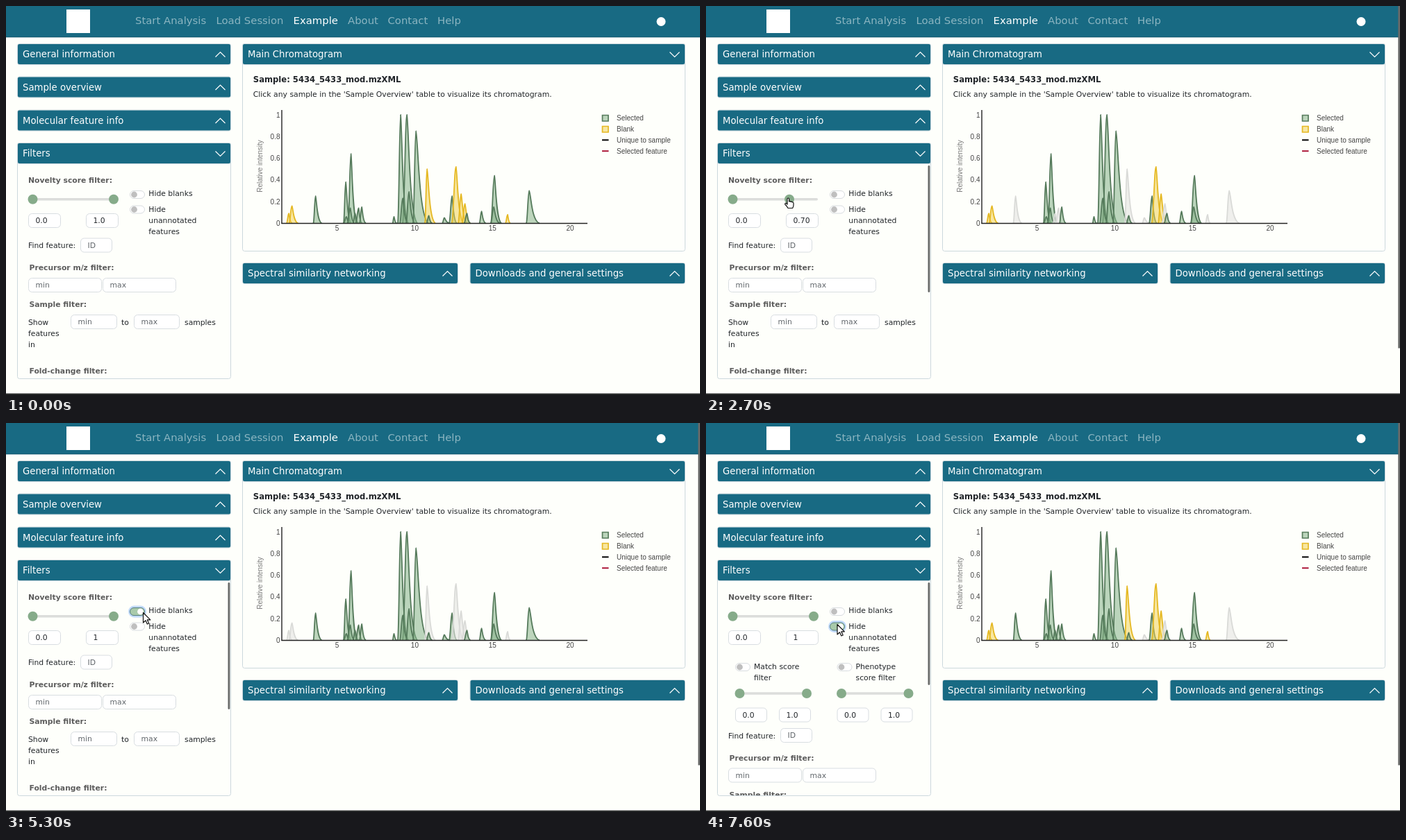
Write an HTML page that moves like this. It is 999 by 561 pixels and loops after 8000 ms.

```html
<!DOCTYPE html>
<html lang="en">
<head>
<meta charset="utf-8">
<title>Feature filters</title>
<style>
html, body { margin: 0; width: 100%; height: 100%; overflow: hidden; background: #fefffb; }
svg { display: block; font: 10.8px "DejaVu Sans", sans-serif; fill: #212529; }
.nav { font-size: 14.85px; fill: #8bb5c1; }
.head { font-size: 13.25px; fill: #fff; }
.bold { font-weight: bold; fill: #5c5c5c; }
.hint { fill: #62676c; }
.plot { font: 10px "Liberation Sans", Arial, sans-serif; fill: #444; }
</style>
</head>
<body>
<svg id="stage" width="999" height="561" viewBox="0 0 999 561"></svg>
<script>
const LOOP = 8000, TEAL = '#186a83', BASE = 313.3;

const text = (x, y, s, cls = '', more = '') => `<text x="${x}" y="${y}" class="${cls}" ${more}>${s}</text>`;
const rect = (x, y, w, h, fill, r = 0, stroke = 'none') =>
  `<rect x="${x}" y="${y}" width="${w}" height="${h}" rx="${r}" fill="${fill}" stroke="${stroke}"/>`;
const disc = (x, y, r, fill, id = '') => `<circle ${id && `id="${id}"`} cx="${x}" cy="${y}" r="${r}" fill="${fill}"/>`;
const line = (d, color, w = 1, fill = 'none') => `<path d="${d}" stroke="${color}" stroke-width="${w}" fill="${fill}"/>`;

const panel = (x, y, w, h) => rect(x + .5, y + .5, w - 1, h - 1, '#fefffb', 3, '#ccd8dd');
const header = (x, y, w, title, open) =>
  panel(x, y, w, 31) + rect(x + 1, y + 1, w - 2, 29, TEAL, 2) + text(x + 8, y + 20.4, title, 'head') +
  line(`M${x + w - 22.5} ${y + (open ? 12.5 : 19.5)}l7 ${open ? 7 : -7}l7 ${open ? -7 : 7}`, '#fff', 1.2);
const input = (x, y, w, s, cls = 'hint', id = '') =>
  rect(x + .5, y + .5, w - 1, 20, '#fff', 5, '#d8dde1') + text(x + 10.5, y + 14, s, cls, id && `id="${id}"`);
const slider = (a, b, y, id) =>
  rect(a, y - 1.7, b - a + 6, 3.4, '#dcdddb', 1.7) + disc(a, y, 7, '#86ab8a') + disc(b, y, 7, '#86ab8a', id);

function toggle(x, y, on, focus) {
  const ring = focus ? rect(x - 2, y - 8.5, 26, 17, '#c2dafb', 8.5) : '';
  const edge = focus ? (on ? '#56807f' : '#86b7fe') : '#d8dcdf';
  return ring + rect(x + .5, y - 5.5, 21, 11, on ? '#a9caab' : '#fff', 5.5, edge) +
    disc(on ? x + 15.5 : x + 6.5, y, 4.4, on ? '#fff' : focus ? '#83b8d4' : '#bfbfbf');
}

// centre, height, left width, right width, kind (g/b), flags: n = novelty, u = unannotated
const peaks = [
  [407, .09, 3, 5, 'b'], [411.5, .16, 4, 9, 'b'], [445.5, .25, 3, 9, 'gn'],
  [489, .38, 3, 8, 'g'], [490, .06, 4, 6, 'g'], [496.5, .64, 4, 9, 'g'], [495.5, .14, 4, 6, 'g'],
  [502.5, .09, 3, 5, 'gn'], [507.5, .14, 4, 5, 'gn'], [512, .15, 3, 6, 'g'], [558.5, .06, 2, 4, 'g'],
  [568, 1, 4, 11, 'g'], [577, 1, 6, 15, 'g'], [571, .23, 4, 8, 'g'], [580, .29, 4, 9, 'g'],
  [590, .85, 4, 18, 'g'], [606, .5, 3, 12, 'bn'], [608.5, .07, 3, 5, 'g'], [631, .05, 3, 8, 'gnu'],
  [642, .25, 4, 7, 'g'], [647.7, .52, 6, 11, 'b'], [655, .27, 4, 9, 'b'], [660.5, .18, 4, 8, 'bnu'],
  [663.5, .09, 4, 5, 'g'], [684.5, .11, 3, 6, 'g'], [703, .44, 5, 10, 'g'], [702, .15, 4, 9, 'g'],
  [722, .08, 3, 4, 'bn'], [753, .3, 4, 15, 'gnu']
];
const tint = { g: ['#557a5b', '#86b2898c'], b: ['#e5b822', '#f2d04a80'], off: ['#d9dad7', '#e4e5e299'] };

function drawPeaks(hidden) {
  return peaks.map(([c, h, l, r, kind]) => {
    const H = h * 156.3, top = BASE - H, foot = BASE - H * .08;
    const [stroke, fill] = tint[[...kind].some(k => hidden.includes(k)) ? 'off' : kind[0]];
    return line(`M${c - l} ${BASE}C${c - l * .6} ${foot} ${c - l * .35} ${top} ${c} ${top}` +
      `C${c + r * .2} ${top + H * .12} ${c + r * .22} ${foot} ${c + r} ${BASE}`, stroke, 1.8, fill);
  }).join('');
}

function chart() {
  let s = '';
  for (const v of [0, .2, .4, .6, .8, 1]) s += text(394.5, 316.7 - v * 156, v, 'plot', 'text-anchor="end"');
  for (const v of [5, 10, 15, 20]) s += text(364.8 + v * 22.36, 324.3, v, 'plot', 'text-anchor="middle"');
  s += text(0, 0, 'Relative intensity', 'plot', 'text-anchor="middle" transform="translate(368.5 231)rotate(-90)" style="fill:#7a7a7a"');
  s += '<g id="peaks"></g>' + line('M397 150V314', '#222', 1.4) + line('M396.5 313.5H837', '#222', 1.4);
  s += line('M858.5 157.5h8.5v8.5h-8.5z', tint.g[0], 1.7, tint.g[1]) + line('M858.5 173.5h8.5v8.5h-8.5z', tint.b[0], 1.7, tint.b[1]);
  s += line('M858 193.3h9.5', '#000', 2) + line('M858 209.2h9.5', '#ac1738', 2);
  ['Selected', 'Blank', 'Unique to sample', 'Selected feature'].forEach((t, i) => s += text(879, 165.4 + i * 15.8, t, 'plot'));
  return s;
}

function page() {
  let s = rect(0, 0, 999, 45, TEAL) + rect(0, 44.3, 999, 1, '#145a70') + rect(87, 5, 34, 34, '#fff') + disc(943, 22.5, 6.5, '#fff');
  [['Start Analysis', 186], ['Load Session', 302.5], ['Example', 413.5], ['About', 492], ['Contact', 549.5], ['Help', 621]]
    .forEach(([t, x]) => s += text(x, 26, t, 'nav', t === 'Example' ? 'style="fill:#fff"' : ''));

  s += panel(16, 197, 308, 341) + panel(340, 54, 638, 300);
  s += header(16, 54, 308, 'General information') + header(16, 101.5, 308, 'Sample overview') +
    header(16, 149.5, 308, 'Molecular feature info') + header(16, 197, 308, 'Filters', true) +
    header(340, 54, 638, 'Main Chromatogram', true) + header(340, 370, 311, 'Spectral similarity networking') +
    header(667.5, 370, 310.5, 'Downloads and general settings');

  s += text(355.8, 110, 'Sample: 5434_5433_mod.mzXML', '', 'font-weight="bold" font-size="11.6"') +
    text(355.8, 131, "Click any sample in the 'Sample Overview' table to visualize its chromatogram.", '', 'font-size="10.83"') + chart();

  s += text(32, 254.5, 'Novelty score filter:', 'bold') + slider(38.5, 155, 278.7, 'knob') +
    input(32, 299, 47, '0.0', '') + input(115, 299, 47, '1.0', '', 'value') + '<g id="toggles"></g>' +
    text(205.3, 274, 'Hide blanks') + text(205.3, 296.5, 'Hide') + text(205.3, 312.5, 'unannotated') + text(205.3, 328.5, 'features');

  s += '<g id="extra">' + toggle(42, 352) + text(69, 355, 'Match score') + text(69, 370.5, 'filter') +
    toggle(188.5, 352) + text(215.5, 355, 'Phenotype') + text(215.5, 370.5, 'score filter');
  for (const x of [42, 188.5])
    s += slider(x + 6.5, x + 103, 390) + input(x, 410.5, 46, '0.0', '') + input(x + 63, 410.5, 46, '1.0', '');
  s += '</g><clipPath id="clip"><path d="M17 228h306v309H17z"/></clipPath><g clip-path="url(#clip)"><g id="rest">';
  s += text(32, 349, 'Find feature:') + input(107, 334.5, 46, 'ID') + text(33.5, 381, 'Precursor m/z filter:', 'bold') +
    input(32, 392, 106, 'min') + input(139, 392, 106, 'max') + text(33.5, 434, 'Sample filter:', 'bold') +
    text(32, 459.5, 'Show') + text(32, 476, 'features') + text(32, 492, 'in') + input(93, 445, 67, 'min') +
    text(166, 459.5, 'to') + input(184, 445, 66, 'max') + text(257, 459.5, 'samples') + text(33.5, 530, 'Fold-change filter:', 'bold');
  s += '</g></g><g id="bars"><path d="M996.3 0H999V493.5H996.3z"/>' +
    '<rect id="bar" x="319.5" y="230" width="2.8" rx="1.4"/></g>' + rect(0, 558.7, 999, 2.3, '#2a2c2d');
  return s + '<g id="cursor" stroke="#111" stroke-width="1.2" stroke-linejoin="round" fill="#fff"><path id="arrow" d="M.5 .5V15L4 11.8L6.3 17L8.7 16L6.4 10.9H10.8Z"/>' +
    '<path id="hand" d="M4 10V2Q5.3 0 6.6 2V6Q8 5 9 6.4Q10.4 5.8 11.2 7Q12.8 6.6 13 8.4V11Q13 13 11.7 15.5H5Q3 12 .7 10Q.8 7.7 2.6 8.6Z"/></g>';
}

const stage = document.getElementById('stage');
stage.innerHTML = page();
const $ = id => document.getElementById(id);

// time, x, y
const cursorPath = [
  [400, 91, 330], [1100, 148, 276], [1200, 153, 275], [1300, 156, 275], [1400, 158, 276], [1600, 158, 276],
  [1700, 150, 276], [1800, 142, 276], [1900, 142, 276], [2000, 130, 276], [2100, 121, 276], [2300, 121, 276],
  [2400, 118, 276], [2700, 113, 276], [2800, 113, 276], [2900, 112, 277], [3400, 165.5, 283], [3700, 203, 284],
  [4100, 203, 284], [4200, 226, 283], [4500, 200, 265.5], [4600, 200, 265.5], [4700, 194, 267], [4800, 189, 267],
  [5000, 189, 267], [5300, 197, 273], [5500, 197, 273], [5700, 194, 272], [6200, 194, 272], [6700, 199, 284],
  [6800, 199, 284], [6900, 189, 289.5], [7500, 189, 289.5], [7600, 188.5, 290]
];
const knobPath = [[2100, 155], [2200, 128], [2300, 128], [2400, 125], [2700, 120], [2800, 120], [2900, 118], [3400, 145.6], [3500, 155]];

function along(path, t) {
  const i = path.findIndex(k => k[0] > t);
  if (i < 0) return path.at(-1).slice(1);
  if (!i) return path[0].slice(1);
  const a = path[i - 1], b = path[i], f = (t - a[0]) / (b[0] - a[0]);
  return a.slice(1).map((v, j) => v + (b[j + 1] - v) * f);
}

let shown = -1;
function draw(now) {
  requestAnimationFrame(draw);
  const t = Math.floor(now % LOOP / 100) * 100;
  if (t === shown) return;
  shown = t;
  const within = (a, b) => t >= a && t < b;
  const show = (id, on) => $(id).setAttribute('display', on ? 'inline' : 'none');

  const [x, y] = along(cursorPath, t), hand = within(1300, 3300);
  $('cursor').setAttribute('transform', `translate(${x} ${y})`);
  show('cursor', t >= 400);
  show('arrow', !hand);
  show('hand', hand);

  const [knob] = along(knobPath, t), value = 1 - (155 - knob) / 117;
  $('knob').setAttribute('cx', knob);
  $('value').textContent = t < 2200 ? '1.0' : value < 1 ? value.toFixed(2) : '1';

  const expanded = t >= 7200;
  $('peaks').innerHTML = drawPeaks((value < 1 ? 'n' : '') + (within(5200, 6200) ? 'b' : '') + (expanded ? 'u' : ''));
  $('toggles').innerHTML = toggle(178, 272, within(4800, 5900), within(4800, 6900)) + toggle(178, 293.5, t >= 6900, t >= 6900);
  show('extra', expanded);
  $('rest').setAttribute('transform', `translate(0 ${expanded ? 105.5 : 0})`);
  $('bar').setAttribute('height', expanded ? 148 : 183);
  show('bars', t >= 400);
  $('bars').setAttribute('fill', t < 1700 ? '#cbcdca' : t < 1800 ? '#999b99' : '#686a69');
}
requestAnimationFrame(draw);
</script>
</body>
</html>
```
